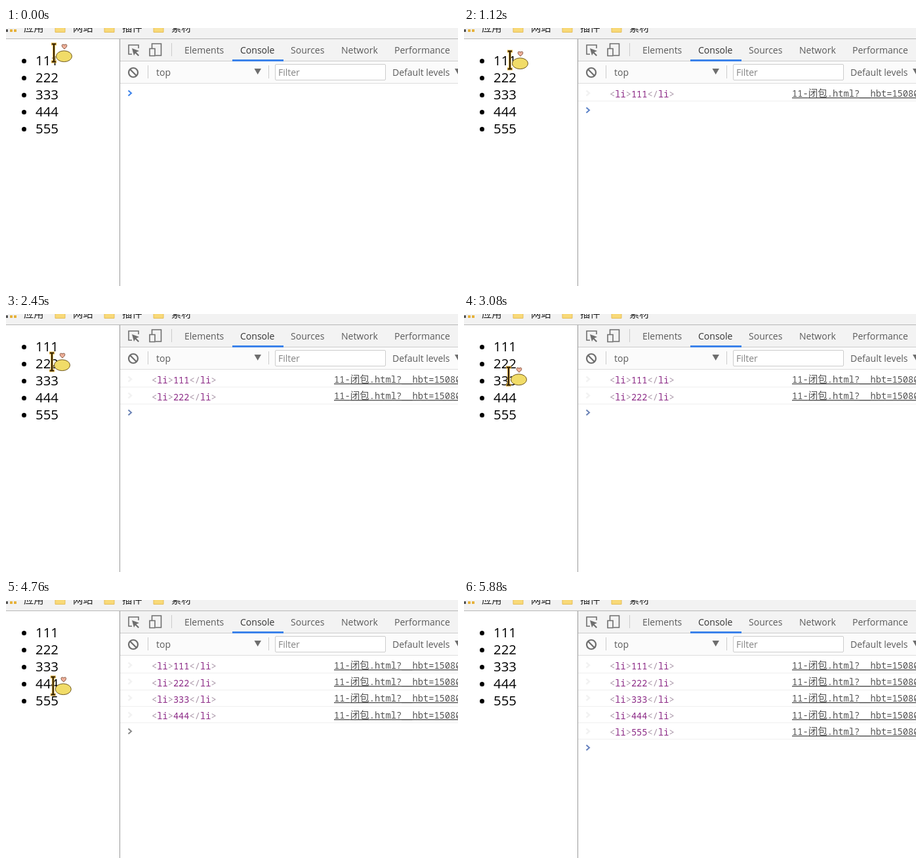
An HTML page for the animation above (7.07 s loop, 689 px wide and 394 px high).

```html
<!DOCTYPE html>
<html lang="zh">
<head>
<meta charset="utf-8">
<style>
  html, body { margin: 0; width: 100%; height: 100%; overflow: hidden; background: #fff; }
  svg { display: block; width: 689px; height: 394px; }
  text { font: 14px "Open Sans", "Noto Sans", sans-serif; fill: #5a5a5a; white-space: pre; }
  .cjk { font: 15.3px "Noto Sans CJK SC", "Noto Sans CJK", sans-serif; fill: #222; }
  .item { font-size: 20.4px; fill: #000; }
  .code, .link { font: 13.7px "Noto Sans Mono", monospace; }
  .code { fill: #a894a6; }
  .code tspan { fill: #8c2a86; }
  .link { fill: #545454; text-decoration: underline 1px; text-underline-offset: 1px; text-decoration-skip-ink: none; }
  .link tspan { font: 14.6px "Noto Sans CJK SC", "Noto Sans CJK", sans-serif; }
  .icon { fill: none; stroke: #6e6e6e; stroke-width: 1.6; }
  .sep { stroke: #ccc; }
</style>
</head>
<body>
<svg viewBox="0 0 689 394">
  <!-- bookmarks bar -->
  <path d="M0 0H689V16H0z" fill="#f2f2f2"/>
  <path d="M0 16.5H689" stroke="#b6b6b6"/>
  <path d="M0 2h3v4H0z" fill="#555"/>
  <path d="M6 2h4v4H6zM12 2h4v4h-4z" fill="#e6b23c"/>
  <g id="marks"></g>

  <!-- page list -->
  <g id="list"></g>

  <!-- developer tools -->
  <path d="M174 17H689V50H174z" fill="#f3f3f3"/>
  <path d="M174 51H689V84H174z" fill="#fbfbfb"/>
  <path d="M173.5 17V394" stroke="#999"/>
  <path d="M174 50.5H689" stroke="#ccc"/>
  <path d="M174 84.5H689" stroke="#ddd"/>
  <path d="M345 48H423V51H345z" fill="#3b82ea"/>
  <path class="sep" d="M252.5 23V43M216.5 57V77M400.5 57V77"/>
  <path class="icon" d="M202 31V26H187V40H192"/>
  <path d="M192 31L203 35L198.5 37L203 41.5L201.5 43L197 38.5L195 42z" fill="#6e6e6e"/>
  <path class="icon" d="M222.5 31V24H236.5V42H228M219 31.5H227V42.5H219z"/>
  <g class="icon" style="stroke-width:2.2"><circle cx="194" cy="68" r="7"/><path d="M189 63L199 73"/></g>
  <path d="M378.5 62H389L383.7 71zM684 62H694.5L689.2 71z" fill="#6e6e6e"/>
  <rect x="410.5" y="55.5" width="168" height="24" rx="1.5" fill="#fff" stroke="#ccc"/>
  <g id="tabs"></g>
  <text x="229" y="73">top</text>
  <text x="415" y="73" fill-opacity=".75">Filter</text>
  <text x="589" y="73">Default levels</text>

  <g id="rows"></g>
  <path id="prompt" d="M186.500 95.500L191 99.500L186.500 103.500" fill="none" stroke-width="2"/>

  <!-- pointer, placed by the middle of its beam -->
  <g id="pointer">
    <g fill="none">
      <path d="M-4 -13.500H4M0 -13.500V13.500M-4 13.500H4" stroke="#dcae3c" stroke-width="3.800"/>
      <path d="M-3 -13.500H3M0 -13.500V13.500M-3 13.500H3" stroke="#2e1e04" stroke-width="2"/>
    </g>
    <ellipse cx="15.500" cy="5.200" rx="12" ry="8.400" fill="#f1dc68" stroke="#6e5820"/>
    <path d="M16 -6C10 -10 12 -15 16 -12C20 -15 22 -10 16 -6z" fill="#efb09a" stroke="#80523c"/>
  </g>
</svg>
<script>
  const $ = id => document.getElementById(id);
  const fill = (id, data, html) => $(id).innerHTML = data.map(html).join('');

  const LOOP = 7070, STEP = 70, PITCH = 25.2;
  const items = [111, 222, 333, 444, 555];
  const logTimes = [1120, 2450, 3360, 4270, 5320];
  const promptColors = ['#3b82ea', '#5c83c8', '#6a82b5', '#5c83c8', '#888', '#6580be'];

  // pointer moves: start, number of steps, end x, end y
  const home = [73, 38];
  const moves = [
    [210, 1, 73, 51], [630, 2, 71, 38], [770, 2, 70, 49],
    [1330, 4, 82, 77], [1820, 2, 70, 73], [2730, 3, 68, 93],
    [3080, 1, 68, 95], [3500, 4, 79, 119], [3850, 1, 73, 125],
    [4760, 5, 67, 155], [5670, 2, 402, 238], [5810, 1, 650, 375],
    [5880, 1, 720, 500]
  ];

  fill('marks', ['应用', '网站', '插件', '素材'], (name, i) => {
    const x = 27 + 75 * i;
    const folder = i ? `<path d="M${x - 27} -4h15v10.500h-15z" fill="#f8d978" stroke="#e5bd58"/>` : '';
    return `${folder}<text class="cjk" x="${x}" y="5">${name}</text>`;
  });

  fill('list', items, (n, i) =>
    `<circle cx="27.500" cy="${50.5 + 26 * i}" r="3.500"/>
     <text class="item" x="45" y="${57 + 26 * i}">${n}</text>`);

  fill('tabs', [['Elements', 272], ['Console', 357], ['Sources', 434], ['Network', 511], ['Performance', 592]],
    ([name, x]) => `<text x="${x}" y="39"${name === 'Console' ? ' style="fill:#333"' : ''}>${name}</text>`);

  fill('rows', items, (n, i) => {
    const y = PITCH * i;
    return `<g>
      <path d="M174 ${111.5 + Math.ceil(y)}H689" stroke="#efefef"/>
      <path d="M186.500 ${95.5 + Math.round(y)}l4.500 4l-4.500 4" fill="none" stroke="#f2f2f2" stroke-width="2.500"/>
      <text class="code" x="222" y="${106 + Math.round(y + .3)}">&lt;<tspan>li</tspan>&gt;<tspan>${n}</tspan>&lt;/<tspan>li</tspan>&gt;</text>
      <text class="link" x="500" y="${105 + Math.round(y)}">11-<tspan>闭包</tspan>.html?__hbt=15080</text>
    </g>`;
  });

  function pointerAt(t) {
    let [x, y] = home;
    for (const [start, steps, endX, endY] of moves) {
      if (t < start) break;
      const k = Math.min(1, (Math.floor((t - start) / STEP) + 1) / steps);
      x += (endX - x) * k;
      y += (endY - y) * k;
    }
    return [x, y];
  }

  function draw(now) {
    const t = now % LOOP;
    const count = logTimes.filter(at => t >= at).length;
    [...$('rows').children].forEach((row, i) => row.style.display = i < count ? '' : 'none');
    $('prompt').setAttribute('transform', `translate(0 ${Math.ceil(PITCH * count)})`);
    $('prompt').setAttribute('stroke', promptColors[count]);
    $('pointer').setAttribute('transform', `translate(${pointerAt(t)})`);
    requestAnimationFrame(draw);
  }
  requestAnimationFrame(draw);
</script>
</body>
</html>
```
